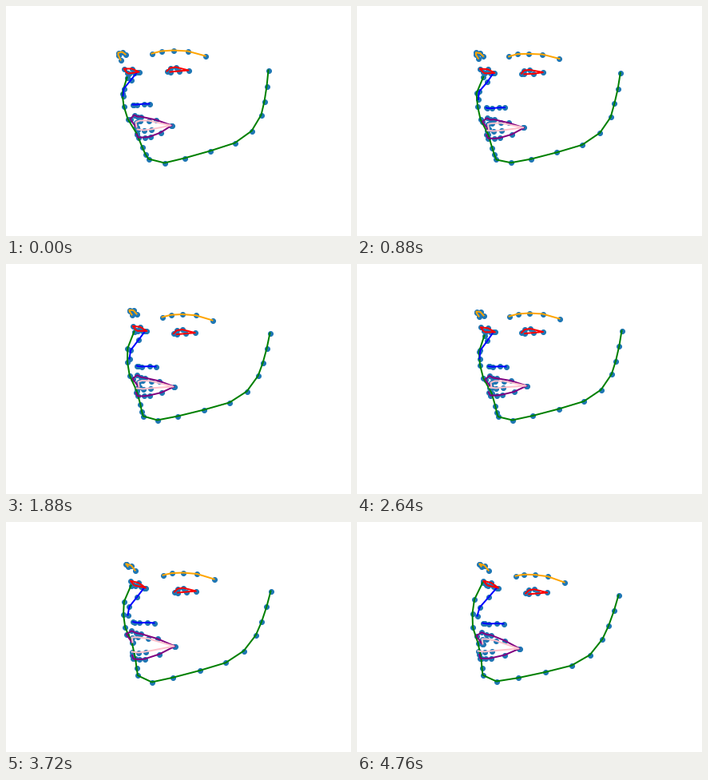
Write a matplotlib script that moves like this. It is 432 by 288 pixels and loops after 4800 ms.

```python
import numpy as np
import matplotlib.pyplot as plt
from matplotlib.animation import FuncAnimation

W, H, DPI = 432, 288, 72
FRAMES, STEP = 120, 40
KEYS = np.array([0, 440, 1280, 1880, 2640, 3720, 4760]) / STEP
rng = np.random.default_rng(4)


def track(dx, dy):
    """Shift of one spot of the face at each key, starting at rest."""
    return np.array([[0, *dx], [0, *dy]], float).T


# Spots that lead the motion
ear = track([6, 7, 9, 8, 5, 6], [-1, 0, -5, 0, -10, -14])
cheek = track([0, 1, 0, 5, -6, -12], [1, 1, -1, 2, -9, -8])
chin = track([-6, -6, -9, -4, -16, -24], [2, -1, -1, -1, 4, 3])
jowl = track([-3, -4, -6, -2, -10, -16], [3, 2, 3, 1, 5, 10])
far_ear = track([1, 1, 2, 3, 3, -1], [3, 4, 6, 3, 6, 11])
brow_a = track([8, 9, 14, 9, 9, 12], [-2, -1, -4, -2, -12, -12])
brow_b = track([9, 8, 14, 9, 12, 15], [1, 3, 2, 4, 0, 0])
brow_c = track([8, 6, 13, 8, 14, 16], [3, 5, 7, 6, 7, 8])
brow_d = track([5, 2, 9, 4, 11, 10], [3, 5, 8, 6, 9, 13])
nose = track([6, 5, 8, 7, 6, 4], [3, 6, 6, 6, 4, 5])
lip = track([0, 3, 3, 5, -5, -6], [2, 4, 2, 3, -1, 1])
corner = track([3, 1, 3, 5, 4, -4], [3, 3, 4, 3, 6, 9])
low_lip = track([-2, -1, -1, 1.5, -7, -13], [4, -1, 1, 0, 8, 7])

# Spots that follow from the ones above
eye_out = 0.4 * (brow_a + brow_b)
eye_in = 0.7 * brow_b
far_eye = 0.375 * (brow_c + brow_d)
nostril = (nose + lip) / 2
mid_lip = (lip + corner) / 2

parts = []


def part(color, rest, leads, drop=None):
    """Line through rest points; leads maps point index to a track,
    drop maps point index to how far it follows the talking jaw."""
    rest = np.array(rest, float)
    index = np.arange(len(rest))
    spots = list(leads)
    tracks = np.array(list(leads.values()))
    keys = np.array([
        rest + np.transpose([np.interp(index, spots, tracks[:, k, axis])
                             for axis in (0, 1)])
        for k in range(len(KEYS))])
    drop = drop or {0: 0}
    follow = np.interp(index, list(drop), list(drop.values()))
    noise = rng.normal(0, 0.3, (FRAMES, len(rest), 2))
    parts.append((color, keys, follow, noise))


part("green",
     [(151, 89), (145, 109), (147, 125), (152, 141), (163, 159), (170, 176),
      (174, 185), (178, 191), (198, 196), (223, 190), (255, 181), (286, 171),
      (307, 156), (319, 136), (323, 119), (326, 100), (328, 80)],
     {0: ear, 4: cheek, 8: chin, 12: jowl, 16: far_ear},
     {3: 0, 7: 1, 9: 1, 13: 0})
part("orange",
     [(143, 67), (140, 61), (140, 58), (145, 57), (149, 60)],
     {0: brow_a, 4: brow_b})
part("orange",
     [(182, 59), (194, 56), (209, 55), (227, 56), (249, 62)],
     {0: brow_c, 4: brow_d})
part("blue",
     [(164, 82), (156, 92), (147, 103), (146, 112)],
     {0: eye_in, 3: nose})
part("blue",
     [(158, 123), (159, 123), (163, 123), (172, 122), (179, 122)],
     {0: nostril, 4: nose})
part("red",
     [(151, 83), (147, 78), (157, 78), (166, 82), (160, 83), (153, 84)],
     {1: eye_out, 3: eye_in, 5: eye_out})
part("red",
     [(201, 81), (205, 77), (212, 76), (228, 80), (216, 81), (205, 82)],
     {0: far_eye})
part("purple",
     [(162, 151), (155, 141), (160, 136), (164, 138), (168, 138), (187, 142),
      (207, 149), (193, 158), (180, 163), (173, 164), (165, 164), (163, 160)],
     {1: lip, 4: nostril, 6: corner, 8: low_lip, 11: 0.8 * low_lip},
     {5: 0, 6: 0.2, 8: 1})
part("pink",
     [(163, 151), (162, 145), (167, 143), (178, 143), (206, 149), (181, 154),
      (172, 155), (164, 154)],
     {1: lip, 3: mid_lip, 4: corner, 5: low_lip},
     {3: 0, 4: 0.2, 5: 1})


def pose(keys, follow, noise, frame):
    k = min(np.searchsorted(KEYS, frame, "right") - 1, len(KEYS) - 2)
    u = (frame - KEYS[k]) / (KEYS[k + 1] - KEYS[k])
    ease = u * u * (3 - 2 * u)
    swell = np.sin(np.pi * u)
    points = keys[k] + (keys[k + 1] - keys[k]) * ease + noise[frame] * swell
    points[:, 0] += 3.5 * np.exp(-((frame - 98.5) / 2.5) ** 2)
    points[:, 1] += 2 * swell * (1 - np.cos(2 * np.pi * frame / 7.5)) * follow
    return points + 0.5


fig = plt.figure(figsize=(W / DPI, H / DPI), dpi=DPI, facecolor="white")
ax = fig.add_axes([0, 0, 1, 1])
ax.set_xlim(0, W)
ax.set_ylim(H, 0)
ax.axis("off")
dots = ax.scatter([], [], s=36, color="C0", zorder=1)
lines = [ax.plot([], [], color=p[0], lw=2, zorder=2)[0] for p in parts]


def draw(frame):
    poses = [pose(*p[1:], frame) for p in parts]
    dots.set_offsets(np.concatenate(poses))
    for line, points in zip(lines, poses):
        line.set_data(points[:, 0], points[:, 1])
    return [dots, *lines]


anim = FuncAnimation(fig, draw, frames=FRAMES, interval=STEP, repeat=True,
                     repeat_delay=0, blit=False)
plt.show()
```
